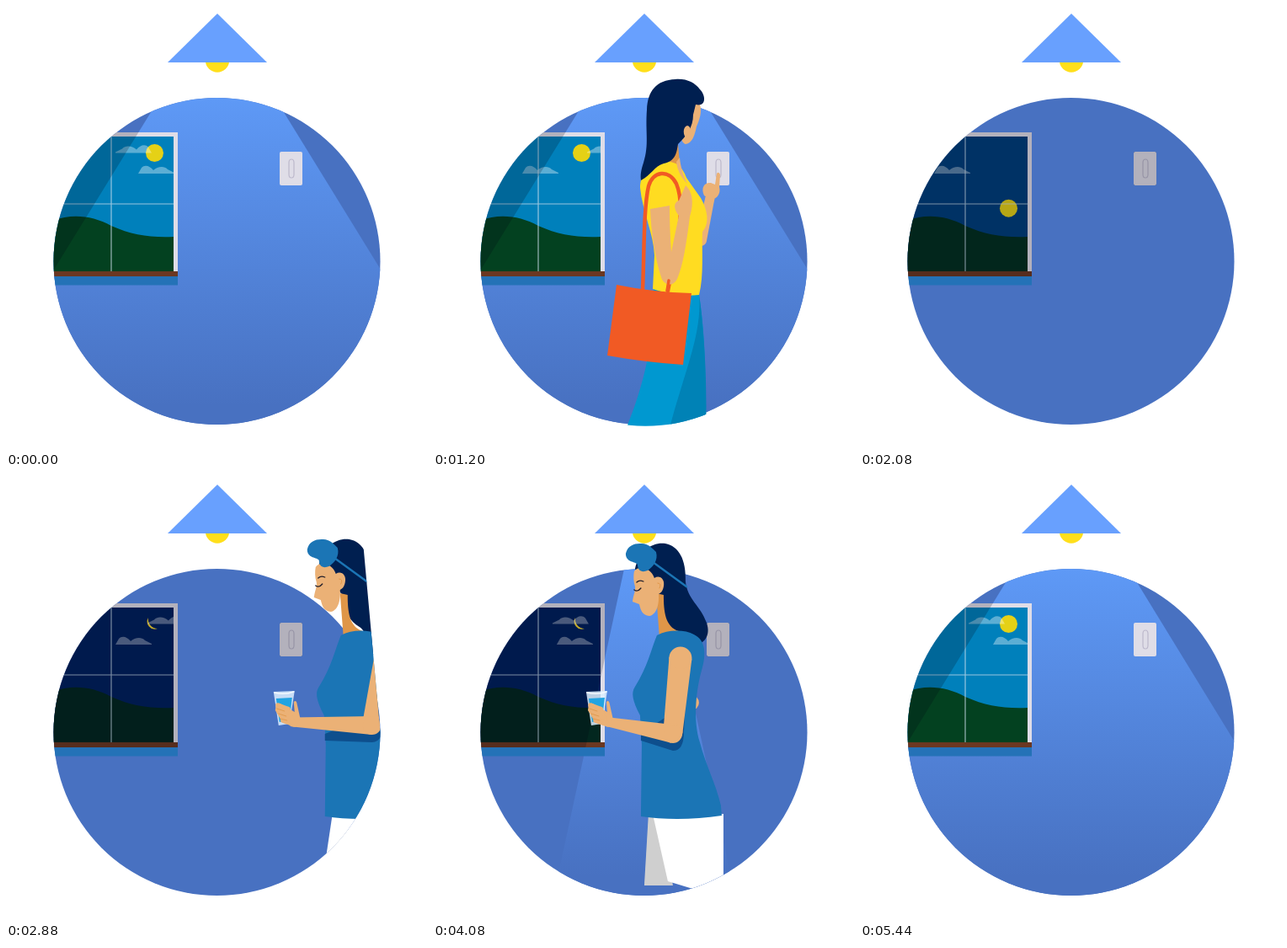
Animation of 500 by 526 pixels, one loop 5.52 s. Source, as an HTML page with a canvas:

```html
<!DOCTYPE html>
<html lang="en">
<head>
<meta charset="utf-8">
<title>Light switch</title>
<style>
html, body { margin: 0; width: 100%; height: 100%; overflow: hidden; background: #fff; }
canvas { display: block; width: 100vw; height: 100vh; }
</style>
</head>
<body>
<canvas id="stage" width="500" height="526"></canvas>
<script>
const LOOP = 5520;
const c = document.getElementById('stage').getContext('2d');
const SKIN = '#ebb176', SHADE = '#df9648', HAIR = '#001f50', BLUE = '#1b75b5', ORANGE = '#f15a24';

// Smooth monotone curve through [time, value] pairs
function track(t, ...keys) {
  const n = keys.length - 1;
  if (t <= keys[0][0]) return keys[0][1];
  if (t >= keys[n][0]) return keys[n][1];
  const slope = i => (keys[i + 1][1] - keys[i][1]) / (keys[i + 1][0] - keys[i][0]);
  const tangent = i => {
    if (i === 0 || i === n) return 0;
    const a = slope(i - 1), b = slope(i);
    return a * b <= 0 ? 0 : 2 * a * b / (a + b);
  };
  let i = 0;
  while (t > keys[i + 1][0]) i++;
  const [t0, a] = keys[i], [t1, b] = keys[i + 1];
  const d = t1 - t0, u = (t - t0) / d, v = 1 - u;
  return a * v * v * (1 + 2 * u) + b * u * u * (3 - 2 * u)
    + d * u * v * (tangent(i) * v - tangent(i + 1) * u);
}

function mix(from, to, p) {
  return `rgb(${from.map((v, i) => Math.round(v + (to[i] - v) * p))})`;
}

function shape(path, color) {
  c.fillStyle = color;
  c.fill(new Path2D(path));
}

function line(path, color, width) {
  c.strokeStyle = color;
  c.lineWidth = width;
  c.lineCap = 'round';
  c.stroke(new Path2D(path));
}

function disc(x, y, r, color) {
  c.fillStyle = color;
  c.beginPath();
  c.arc(x, y, r, 0, 7);
  c.fill();
}

function limb(x1, y1, r1, x2, y2, r2, color) {
  const a = Math.atan2(y2 - y1, x2 - x1) + Math.PI / 2;
  const dx = Math.cos(a), dy = Math.sin(a);
  shape(`M${x1 + dx * r1},${y1 + dy * r1}L${x2 + dx * r2},${y2 + dy * r2}
    L${x2 - dx * r2},${y2 - dy * r2}L${x1 - dx * r1},${y1 - dy * r1}Z`, color);
  disc(x1, y1, r1, color);
  disc(x2, y2, r2, color);
}

function group(draw, x = 0, y = 0, clip) {
  c.save();
  if (clip) c.clip(new Path2D(clip));
  c.translate(x, y);
  draw();
  c.restore();
}

function turn(draw, x, y, angle) {
  group(() => {
    c.rotate(angle);
    c.translate(-x, -y);
    draw();
  }, x, y);
}

function cloud(x, y, flip) {
  group(() => {
    if (flip) c.scale(-1, 1);
    shape('M0,0L4,-7C8,-11 14,-9 18,-4C23,-8 30,-10 35,-5L43,-1V0Z', 'rgba(255,255,255,.36)');
  }, x + (flip ? 43 : 0), y);
}

function drawWindow(t) {
  const night = t < 3600
    ? track(t, [1360, 0], [2080, .68], [2720, 1])
    : track(t, [4560, 1], [5280, 0]);
  shape('M50,150H204V316H50Z', '#dfdde7');
  group(() => {
    c.fillStyle = mix([0, 128, 187], [0, 33, 92], night);
    c.fillRect(50, 155, 149, 160);
    const sunY = t < 3600
      ? track(t, [1360, 174.5], [1760, 190], [2080, 240], [2320, 288])
      : track(t, [4880, 288], [5120, 215], [5400, 174.5]);
    const moonY = t < 3600
      ? track(t, [2280, 115], [2760, 0])
      : track(t, [4560, 0], [4960, 115]);
    disc(176.5, sunY, 10.5, '#e5d116');
    group(() => shape('M169,167A9 9 0 0 0 180,180A11 11 0 0 1 169,167Z', '#f4d532'), 0, moonY);
    cloud(track(t, [0, 130], [1200, 183], [2080, 206], [2880, 168], [3600, 154], [4560, 133], [5440, 129]), 174.5, true);
    cloud(track(t, [0, 157], [1200, 106], [2080, 88], [2880, 130], [3600, 137], [4560, 155], [5440, 158]), 199, false);
    shape('M50,257C75,246 101,248 125,261C150,272 170,275 199,274V315H50Z', mix([3, 65, 32], [2, 39, 31], night));
  }, 0, 0, 'M50,155H199V315H50Z');
  line('M125,155V315M50,235H199', 'rgba(205,222,235,.75)', 1.2);
  shape('M50,315H204V321H50Z', '#6b3822');
}

function drawSwitch() {
  shape('M327,173H350Q352,173 352,175V211Q352,213 350,213H327Q325,213 325,211V175Q325,173 327,173Z', '#dfdde7');
  line('M336,186Q336,182 339,182T342,186V200Q342,204 339,204T336,200Z', '#bdb9cc', 1.2);
}

function drawRoom(t) {
  const on = t < 2400
    ? track(t, [1360, .616], [1640, .4], [1960, 0])
    : track(t, [3740, 0], [4160, .27], [4480, .428], [4560, .457], [4960, .57], [5440, .613]);
  const beam = `M251,-2L${251 + on * 600},598H${251 - on * 600}Z`;
  group(() => {
    c.fillStyle = '#4871c1';
    c.fillRect(50, 100, 400, 400);
    const glow = c.createLinearGradient(0, 109, 0, 475);
    glow.addColorStop(0, '#5e99f6');
    glow.addColorStop(1, '#4871c1');
    shape(beam, glow);
    drawWindow(t);
    drawSwitch();
    // Objects outside the beam are dimmed
    group(() => {
      c.fillStyle = 'rgba(0,0,16,.2)';
      c.fill(new Path2D('M0,0H500V700H0Z' + beam), 'evenodd');
    }, 0, 0, 'M50,150H204V321H50ZM325,173H352V213H325Z');
    shape('M50,321H204V331.500H50Z', '#2472b7');
  }, 0, 0, 'M56.5,303a194 194 0 1 1 388 0a194 194 0 1 1 -388 0Z');
}

function drawLamp() {
  disc(251, 64.5, 14.2, '#ffdf1b');
  shape('M251,9L310,67H192Z', '#68a0fe');
}

function drawVisitor(t) {
  const reach = track(t, [680, 0], [1080, 1], [1400, 1], [1640, 0]);
  const sway = Math.sin(t / 110) * .05 * (1 - track(t, [700, 0], [1120, 1], [1440, 1], [1700, 0]));
  turn(() => {
    limb(318, 278, 7, 329, 228, 5.5, SKIN);
    shape('M322,225C318,216 322,209 330,210L335,212L337,199Q339,196 341,200L340,215C342,222 338,229 330,230Z', SKIN);
  }, 316, 276, (1 - reach) * 2.6);
  shape('M262,335C263,400 250,452 228,505H322C326,450 322,380 316,343Z', '#0098d0');
  shape('M316,343C320,390 298,435 280,505H324C326,450 322,380 316,343Z', '#0082b6');
  shape('M290,150L293,188L302,214L280,205L275,188Z', SHADE);
  shape('M277,185C257,188 246,199 246,216C249,245 262,270 263,296L261,336Q290,346 316,343C322,320 319,290 320,268C329,258 326,242 318,228L301,204C296,190 288,184 277,185Z', '#ffdc21');
  shape('M289,185L293,180C294,192 298,203 302,211C294,203 290,194 289,185Z', SKIN);
  // Head
  shape('M307,112L317,117C320,126 316,136 313,143C311,153 308,163 300,164C293,162 292,145 297,130Z', SKIN);
  shape('M312,117C325,120 324,106 317,99C311,91 301,86 288,87C265,88 255,101 254,123C252,151 257,164 250,186C247,195 246,201 247,207C259,201 263,190 274,187C287,184 289,177 291,164C301,154 309,144 309,129Z', HAIR);
  shape('M302,142C296,144 297,154 301,157C305,152 308,143 302,142Z', SKIN);
  turn(() => {
    line('M249,337C251,290 250,240 256,214C261,196 280,193 289,211C297,230 294,260 289,286L279,338', ORANGE, 4.5);
  }, 270, 200, sway);
  // Near arm
  shape('M258,241L281,237C281,260 282,276 283,292L292,249C285,240 286,233 292,231L300,213C310,222 309,238 305,250C301,282 297,308 290,324C285,334 274,332 271,322C264,300 259,270 258,241Z', SKIN);
  turn(() => {
    line('M280,326L278,338', ORANGE, 3.5);
    shape('M218,331Q262,340 307,341L297,426Q252,423 207,415Z', ORANGE);
  }, 270, 200, sway);
}

function drawGlass() {
  shape('M277,255L302,254L296,293L283,295Z', 'rgba(222,240,255,.85)');
  shape('M280,263L299,262L296,289L284,291Z', '#22a4e2');
  line('M278,256Q290,259 301,255', '#f4faff', 1.5);
  shape('M279,277Q280,267 285,269L302,279L301,267Q304,264 305,270L309,288L303,297L288,292Z', SKIN);
  for (let i = 0; i < 4; i++) {
    limb(282 + i * 2, 271 + i * 6, 2.7, 294 + i * 2, 276 + i * 5, 3.2, SKIN);
  }
  line('M281,275L290,278M283,281L292,284M285,287L293,289', SHADE, .8);
}

function drawSleeper(t) {
  const early = track(t, [2880, 1], [3360, 0]);
  const reach = track(t, [3000, 0], [3400, 1], [3700, 1], [3920, 0]);
  const yawn = track(t, [3040, 0], [3440, 1], [3760, 1], [4000, 0]);
  group(() => {
    limb(345, 221, 8, 366, 238, 9, SKIN);
    shape('M335,222C333,214 335,212 338,212L337,200Q339,196 341,200L342,211Q353,207 353,217L350,229Z', SKIN);
  }, (1 - reach) * 36, (1 - reach) * 30);
  // Trousers
  shape('M351,400L346,485H380L366,400Z', '#cfcfcf');
  const hip = 351 + 5 * (1 - early);
  shape(`M${hip},400L${hip + 18 - early * 30},480L440,500V400Z`, '#fff');
  group(() => {
    const d = 20 * early;
    shape(`M335,109C340,87 356,77 371,79C387,82 396,98 395,124C397,145 413,153 420,173C426,${190 + d} 415,${200 + d} 404,${199 + d}C395,${198 + d} 393,188 383,183C369,174 365,164 367,148C351,136 351,124 343,120Z`, HAIR);
  }, 0, -5 * early);
  shape('M360,138L364,190C370,194 383,189 387,183C371,178 369,160 369,140Z', SHADE);
  shape('M361,188C374,181 394,181 405,187C419,194 420,210 414,230C407,255 404,290 412,315C419,342 431,364 437,390L438,402C404,407 370,407 342,403L343,318L341,283C332,266 330,256 335,249C350,225 354,205 361,188Z', BLUE);
  // Head
  group(() => {
    shape('M334,112C340,104 354,108 358,120C364,116 371,121 369,130C368,136 365,138 363,139C364,152 360,164 352,165C344,164 342,159 340,151L332,148C333,140 336,135 335,130C333,124 333,117 334,112Z', SKIN);
    line('M334,134Q338,137 342,132M337,125Q340,122 345,124', '#24202b', 1.3);
    line('M362,126Q367,126 364,132', SHADE, 1);
    if (yawn > .02) {
      c.fillStyle = '#17152a';
      c.beginPath();
      c.ellipse(347, 155, 4 * yawn, 4.500 * yawn, .5, 0, 7);
      c.fill();
    }
    line('M352,98L396,130', BLUE, 2.4);
    shape('M324,91C326,82 333,79 341,79C350,78 355,84 360,89C363,99 356,107 350,111C343,114 338,111 338,104C336,100 324,102 324,91Z', BLUE);
  }, -3 * early, -5 * early);
  // Arm holding the glass
  const shoulder = 389 + early * 25, elbow = 380 + early * 18, drop = 303 - early * 10;
  shape(`M342,313L${elbow},${drop + 22}Q${elbow + 13},${drop + 22} ${elbow + 13},${drop}L${shoulder + 8},235L${shoulder - 10},280L342,305Z`, '#0e4f8d');
  limb(shoulder, 215, 13.5, elbow, drop, 11.5, SKIN);
  limb(elbow, drop + 2, 11, 304, 291, 5.5, SKIN);
  group(drawGlass, 4 * early, 0);
}

function draw(t) {
  c.fillStyle = '#fff';
  c.fillRect(0, 0, 500, 526);
  drawRoom(t);
  drawLamp();
  const bowl = 'V303A194 194 0 0 1 56.5,303Z';
  if (t < 2080) {
    const x = track(t, [40, -285], [560, -128], [1080, 0], [1420, 0], [1700, 75], [2010, 255]);
    const y = track(t, [80, 0], [400, -28], [600, -13], [1000, 0]);
    group(() => drawVisitor(t), x, y, 'M56.5,303L51,60V0H448' + bowl);
  } else if (t > 2560 && t < 4480) {
    const x = track(t, [2560, 190], [2800, 92], [2880, 37], [3120, 0], [3800, 0], [3920, -14], [4160, -150], [4460, -395]);
    group(() => drawSleeper(t), x, 0, 'M56.5,303L51,60V0H417L444.5,303' + bowl);
  }
}

const start = performance.now();
function frame() {
  draw((performance.now() - start) % LOOP);
  requestAnimationFrame(frame);
}
frame();
</script>
</body>
</html>
```
